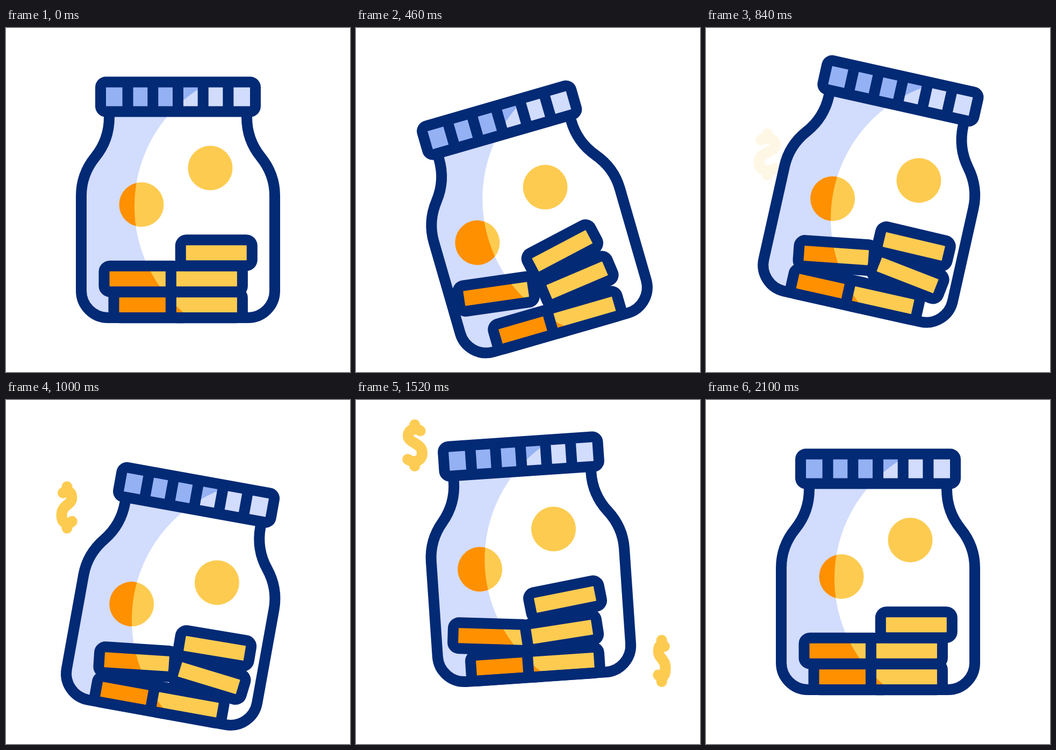
Animation of 640 by 640 pixels, one loop 2.4 s. Source, as an HTML page with a canvas:

```html
<!DOCTYPE html>
<html lang="en">
<head>
<meta charset="utf-8">
<title>Savings jar</title>
<style>
  html, body { margin: 0; width: 100%; height: 100%; overflow: hidden; background: #fff; }
  canvas { display: block; width: 100vmin; height: 100vmin; }
</style>
</head>
<body>
<canvas id="stage" width="640" height="640"></canvas>
<script>
const ctx = document.getElementById('stage').getContext('2d');
const LOOP = 2400, STEP = 20, REST = 2100;
const NAVY = '#022a75', YELLOW = '#fdcb50';

// Times at which the jar turns back, sideways and up or down
const SWINGS = [380, 885, 1360, 1740];
const HOPS = [343, 735, 1070, 1455, 1755];

// The tilt alternates sides and loses the same amount each time
const tilts = SWINGS.map((_, i) => (i % 2 ? 1 : -1) * (18 - 4.8 * i));
const heights = [54.5, -36, 55, -28, 13.5];

// Two flat tones split by a large circle fixed to the jar
function twoTone(light, dark) {
  const g = ctx.createRadialGradient(498.6, 332, 0, 498.6, 332, 519.2);
  g.addColorStop(0.499, light);
  g.addColorStop(0.501, dark);
  return g;
}
const GLASS = twoTone('#ffffff', '#d2dcfd');
const LID = twoTone('#d2dcfd', '#94b1f4');
const GOLD = twoTone(YELLOW, '#ff9000');

const jar = new Path2D(
  'M192 150V166C192 193 183 219 166 240C149 261 140 285 140 312V489A50 50 0 0 0 190 539' +
  'H450A50 50 0 0 0 500 489V312C500 285 491 261 474 240C457 219 448 193 448 166V150Z');
const lid = new Path2D();
lid.roundRect(176, 100.5, 288, 55, 10);
for (let i = -2; i <= 2; i++) lid.rect(320 + i * 46.7, 101, 0, 54);

const dollar = new Path2D(
  'M9.5 -27C0 -33 -17 -31 -17.5 -18C-18 -4 13.5 -5 13.5 14C13.5 31 -6 33 -18.5 26' +
  'M-3 -38.5V-30M-3 30V38.5');

// Left, right and second left are poses [x, y, degrees] relative to the resting place
function disc(x, y, left, right) {
  const shape = new Path2D();
  shape.arc(0, 0, 41.5, 0, 7);
  return { shape, x, y, poses: [left, right, left] };
}

function slab(x, row, width, left = [], right = [], left2 = left) {
  const shape = new Path2D();
  shape.roundRect(-width / 2 - 10, -24, width + 20, 48, 11);
  return { shape, x, y: 515.2 - row * 48.5, line: NAVY, poses: [left, right, left2] };
}

const coins = [
  disc(252, 328.5, [-36, 6], [-11, 23]),
  disc(380, 260.5, [-14, 10], [10, 23]),
  slab(270.5, 0, 120),
  slab(373.4, 0, 113),
  slab(252.5, 1, 120, [-31, -31, 9], [18.5, -13.5, -9], [-18.5, -13.5, 9]),
  slab(373.4, 1, 113, [1, -13, -8], [35, -6.5, 9]),
  slab(391.3, 2, 113, [-29, -25, -12.5], [17, -13, 1], [-12, -31, -12])
];

// Eases along half cosines from 0 through one value per beat and back to 0
function sway(beats, values, t) {
  const times = [0, ...beats, REST];
  const i = Math.max(1, times.findIndex(b => b >= t));
  const from = values[i - 2] || 0, to = values[i - 1] || 0;
  const part = (t - times[i - 1]) / (times[i] - times[i - 1]);
  return from + (to - from) * (1 - Math.cos(Math.PI * part)) / 2;
}

function placed(path, matrix) {
  const p = new Path2D();
  p.addPath(path, matrix);
  return p;
}

function paint(path, fill, line) {
  if (fill) {
    ctx.fillStyle = fill;
    ctx.fill(path);
  }
  if (line) {
    ctx.strokeStyle = line;
    ctx.stroke(path);
  }
}

// A dollar sign rises steadily while it turns; its line keeps its width
function drawDollar(x, y, age) {
  const life = 770, fade = 80;
  if (age <= 0 || age >= life) return;
  const turn = -Math.cos(Math.PI * age / 585);
  ctx.globalAlpha = Math.min(1, age / fade, (life - age) / fade);
  paint(placed(dollar, new DOMMatrix([turn, 0, 0, 1, x, y - age * 0.222])), null, YELLOW);
  ctx.globalAlpha = 1;
}

function drawCoin({ shape, x, y, line, poses }, t) {
  const [dx, dy, deg] = [0, 1, 2].map(k => sway(SWINGS, poses.map(p => p[k]), t));
  const matrix = new DOMMatrix().translate(x + dx, y + dy).rotate(deg);
  paint(placed(shape, matrix), GOLD, line);
}

function draw(t) {
  ctx.setTransform(1, 0, 0, 1, 0, 0);
  ctx.fillStyle = '#fff';
  ctx.fillRect(0, 0, 640, 640);
  ctx.lineWidth = 20;
  ctx.lineCap = ctx.lineJoin = 'round';

  drawDollar(111.7, 238, t - 828);
  drawDollar(570, 568, t - 1148);

  ctx.translate(320, 320 + sway(HOPS, heights, t));
  ctx.rotate(sway(SWINGS, tilts, t) * Math.PI / 180);
  ctx.translate(-320, -320);

  paint(jar, GLASS);
  coins.forEach(c => drawCoin(c, t));
  paint(jar, null, NAVY);
  paint(lid, LID, NAVY);
}

const start = performance.now();
function tick() {
  const t = (performance.now() - start) % LOOP;
  draw(Math.min(REST, Math.floor(t / STEP) * STEP));
  requestAnimationFrame(tick);
}
tick();
</script>
</body>
</html>
```
